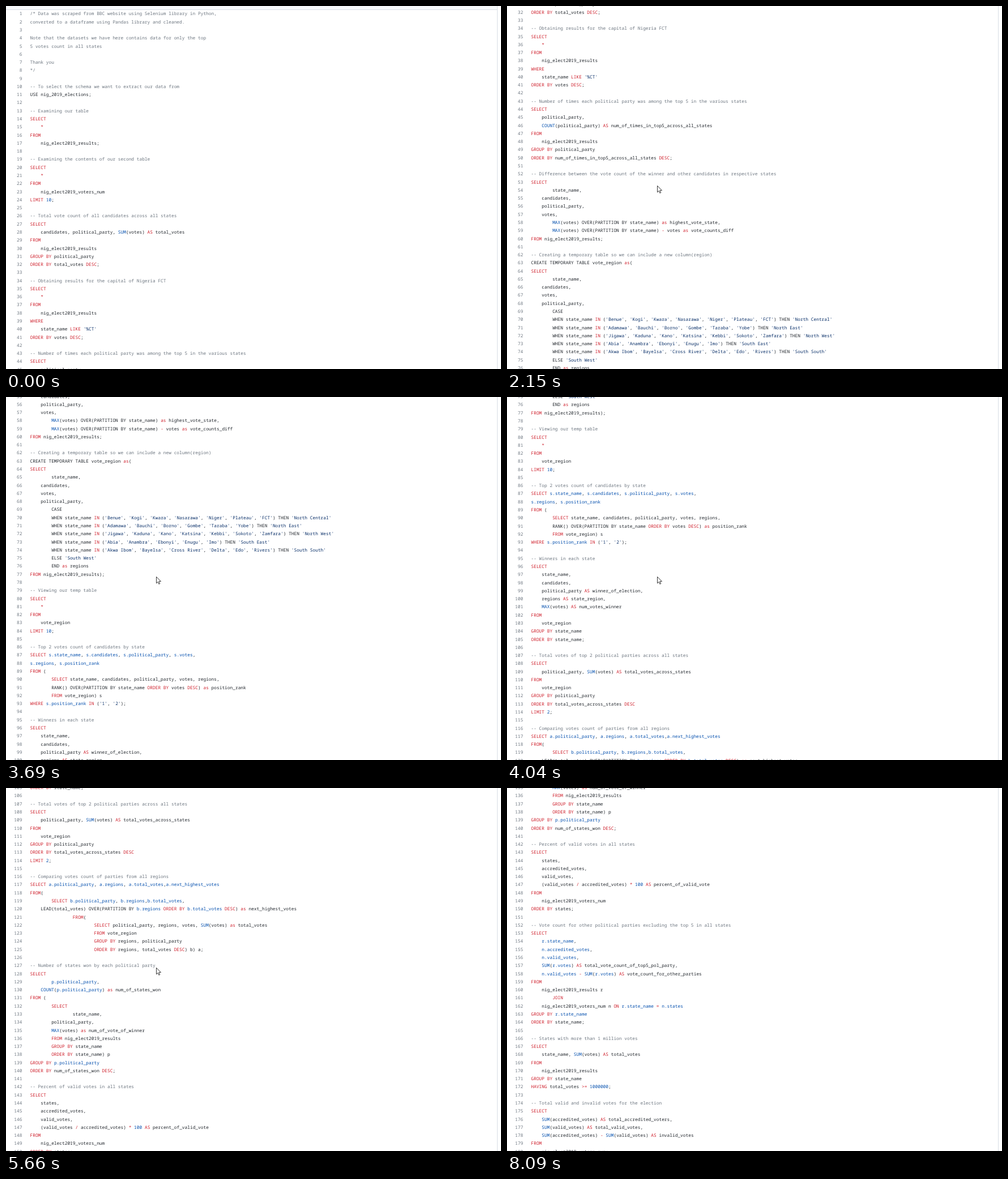
Write an HTML page that moves like this. It is 874 by 641 pixels and loops after 9020 ms.

```html
<!DOCTYPE html>
<html lang="en">
<head>
<meta charset="utf-8">
<title>SQL listing</title>
<style>
html, body { margin: 0; width: 100%; height: 100%; overflow: hidden; background: #fff; }
svg { display: block; width: 874px; height: 641px; }
text {
  font: 7.85px "Noto Sans Mono", "DejaVu Sans Mono", monospace;
  white-space: pre; text-rendering: geometricPrecision; fill: #24292f;
}
.num { text-anchor: end; fill: #6e7781; }
.note { fill: #6e7781; }
.key { fill: #cf222e; }
.val { fill: #0550ae; }
.str { fill: #0a3069; }
</style>
</head>
<body>
<svg viewBox="0 0 874 641" xml:space="preserve">
  <g id="page">
    <rect y="-20" width="867" height="26" fill="#f6f8fa"/>
    <rect y="6" width="867" height="1" fill="#d8dee4"/>
    <g id="code"></g>
  </g>
  <rect x="867" width="1" height="641" fill="#d8dee4"/>
  <path id="cursor" d="M0 0V11.4L2.7 8.9L4.4 12.9L6.2 12.1L4.5 8.2H8Z" fill="#fff" stroke="#222" stroke-width=".9"/>
</svg>
<script>
const source = `/* Data was scraped from BBC website using Selenium library in Python,
converted to a dataframe using Pandas library and cleaned.

Note that the datasets we have here contains data for only the top
5 votes count in all states

Thank you
*/

-- To select the schema we want to extract our data from
USE nig_2019_elections;

-- Examining our table
SELECT
    *
FROM
    nig_elect2019_results;

-- Examining the contents of our second table
SELECT
    *
FROM
    nig_elect2019_voters_num
LIMIT 10;

-- Total vote count of all candidates across all states
SELECT
    candidates, political_party, SUM(votes) AS total_votes
FROM
    nig_elect2019_results
GROUP BY political_party
ORDER BY total_votes DESC;

-- Obtaining results for the capital of Nigeria FCT
SELECT
    *
FROM
    nig_elect2019_results
WHERE
    state_name LIKE '%CT'
ORDER BY votes DESC;

-- Number of times each political party was among the top 5 in the various states
SELECT
    political_party,
    COUNT(political_party) AS num_of_times_in_top5_across_all_states
FROM
    nig_elect2019_results
GROUP BY political_party
ORDER BY num_of_times_in_top5_across_all_states DESC;

-- Difference between the vote count of the winner and other candidates in respective states
SELECT
        state_name,
    candidates,
    political_party,
    votes,
        MAX(votes) OVER(PARTITION BY state_name) as highest_vote_state,
        MAX(votes) OVER(PARTITION BY state_name) - votes as vote_counts_diff
FROM nig_elect2019_results;

-- Creating a temporary table so we can include a new column(region)
CREATE TEMPORARY TABLE vote_region as(
SELECT
        state_name,
    candidates,
    votes,
    political_party,
        CASE
        WHEN state_name IN ('Benue', 'Kogi', 'Kwara', 'Nasarawa', 'Niger', 'Plateau', 'FCT') THEN 'North Central'
        WHEN state_name IN ('Adamawa', 'Bauchi', 'Borno', 'Gombe', 'Taraba', 'Yobe') THEN 'North East'
        WHEN state_name IN ('Jigawa', 'Kaduna', 'Kano', 'Katsina', 'Kebbi', 'Sokoto', 'Zamfara') THEN 'North West'
        WHEN state_name IN ('Abia', 'Anambra', 'Ebonyi', 'Enugu', 'Imo') THEN 'South East'
        WHEN state_name IN ('Akwa Ibom', 'Bayelsa', 'Cross River', 'Delta', 'Edo', 'Rivers') THEN 'South South'
        ELSE 'South West'
        END as regions
FROM nig_elect2019_results);

-- Viewing our temp table
SELECT
    *
FROM
    vote_region
LIMIT 10;

-- Top 2 votes count of candidates by state
SELECT s.state_name, s.candidates, s.political_party, s.votes,
s.regions, s.position_rank
FROM (
        SELECT state_name, candidates, political_party, votes, regions,
        RANK() OVER(PARTITION BY state_name ORDER BY votes DESC) as position_rank
        FROM vote_region) s
WHERE s.position_rank IN ('1', '2');

-- Winners in each state
SELECT
    state_name,
    candidates,
    political_party AS winner_of_election,
    regions AS state_region,
    MAX(votes) AS num_votes_winner
FROM
    vote_region
GROUP BY state_name
ORDER BY state_name;

-- Total votes of top 2 political parties across all states
SELECT
    political_party, SUM(votes) AS total_votes_across_states
FROM
    vote_region
GROUP BY political_party
ORDER BY total_votes_across_states DESC
LIMIT 2;

-- Comparing votes count of parties from all regions
SELECT a.political_party, a.regions, a.total_votes,a.next_highest_votes
FROM(
        SELECT b.political_party, b.regions,b.total_votes,
    LEAD(total_votes) OVER(PARTITION BY b.regions ORDER BY b.total_votes DESC) as next_highest_votes
                FROM(
                        SELECT political_party, regions, votes, SUM(votes) as total_votes
                        FROM vote_region
                        GROUP BY regions, political_party
                        ORDER BY regions, total_votes DESC) b) a;

-- Number of states won by each political party
SELECT
        p.political_party,
    COUNT(p.political_party) as num_of_states_won
FROM (
        SELECT
                state_name,
        political_party,
        MAX(votes) as num_of_vote_of_winner
        FROM nig_elect2019_results
        GROUP BY state_name
        ORDER BY state_name) p
GROUP BY p.political_party
ORDER BY num_of_states_won DESC;

-- Percent of valid votes in all states
SELECT
    states,
    accredited_votes,
    valid_votes,
    (valid_votes / accredited_votes) * 100 AS percent_of_valid_vote
FROM
    nig_elect2019_voters_num
ORDER BY states;

-- Vote count for other political parties excluding the top 5 in all states
SELECT
    r.state_name,
    n.accredited_votes,
    n.valid_votes,
    SUM(r.votes) AS total_vote_count_of_top5_pol_party,
    n.valid_votes - SUM(r.votes) AS vote_count_for_other_parties
FROM
    nig_elect2019_results r
        JOIN
    nig_elect2019_voters_num n ON r.state_name = n.states
GROUP BY r.state_name
ORDER BY state_name;

-- States with more than 1 million votes
SELECT
    state_name, SUM(votes) AS total_votes
FROM
    nig_elect2019_results
GROUP BY state_name
HAVING total_votes >= 1000000;

-- Total valid and invalid votes for the election
SELECT
    SUM(accredited_votes) AS total_accredited_voters,
    SUM(valid_votes) AS total_valid_votes,
    SUM(accredited_votes) - SUM(valid_votes) AS invalid_votes
FROM
    nig_elect2019_voters_num;`;

const LOOP = 9020, PITCH = 14.28, TICK = 71.4;
const page = document.getElementById('page');
const cursor = document.getElementById('cursor');

const token = /('[^']*')|(\b[a-z]\.\w+|\b(?:SUM|MAX|COUNT)\b|\b\d+\b)|(\b(?:SELECT|FROM|WHERE|GROUP BY|ORDER BY|LIMIT|LIKE|DESC|AS|as|IN|JOIN|ON|HAVING)\b|[-*\/=>]+)/g;
const span = (cls, s) => `<tspan class="${cls}">${s}</tspan>`;
const paint = line => line.replace(token, (s, str, val) => span(str ? 'str' : val ? 'val' : 'key', s));

document.getElementById('code').innerHTML = source.split('\n').map((line, i) => {
  const y = (16.4 + i * PITCH).toFixed(2);
  const body = i < 8 || line.startsWith('--') ? span('note', line) : paint(line);
  return `<text class="num" x="28.4" y="${y}">${i + 1}</text><text x="42.5" y="${y}">${body}</text>`;
}).join('');

// Wheel bursts: start ms, step ms, steps, wheel ticks, px moved by the first step
const bursts = [
  [870, 68, 6, 6, 4],
  [2150, 70, 5, 5, 17],
  [3690, 70, 6, 4, 0.6],
  [5170, 70, 8, 6, 4],
  [7320, 70, 8, 6, 4.2]
];

const clamp = v => Math.max(0, Math.min(1, v));
const glide = p => (1 - Math.cos(Math.PI * Math.pow(p, 0.9))) / 2;
const stepped = (t, start, step, n) => clamp(Math.floor((t - start) / step) / (n - 1));

function scrollAt(t) {
  let s = 0;
  for (const [start, step, n, ticks, first] of bursts) {
    if (t < start) break;
    s += first + (ticks * TICK - first) * glide(stepped(t, start, step, n));
  }
  return s;
}

function cursorAt(t) {
  const left = 1 - stepped(t, 120, 70, 7);
  const out = stepped(t, 7600, 70, 7);
  return [265.5 + 290 * left ** 1.6 + 600 * out ** 1.7, 317.5 + 224 * left ** 1.6 + 190 * out ** 1.5];
}

function draw(t) {
  page.setAttribute('transform', `translate(0 ${-scrollAt(t).toFixed(2)})`);
  const [x, y] = cursorAt(t);
  cursor.setAttribute('transform', `translate(${x.toFixed(2)} ${y.toFixed(2)})`);
  cursor.setAttribute('visibility', t >= 120 && t < 8090 ? 'visible' : 'hidden');
}

const begin = performance.now();
function tick() {
  draw((performance.now() - begin) % LOOP);
  requestAnimationFrame(tick);
}
tick();
</script>
</body>
</html>
```
